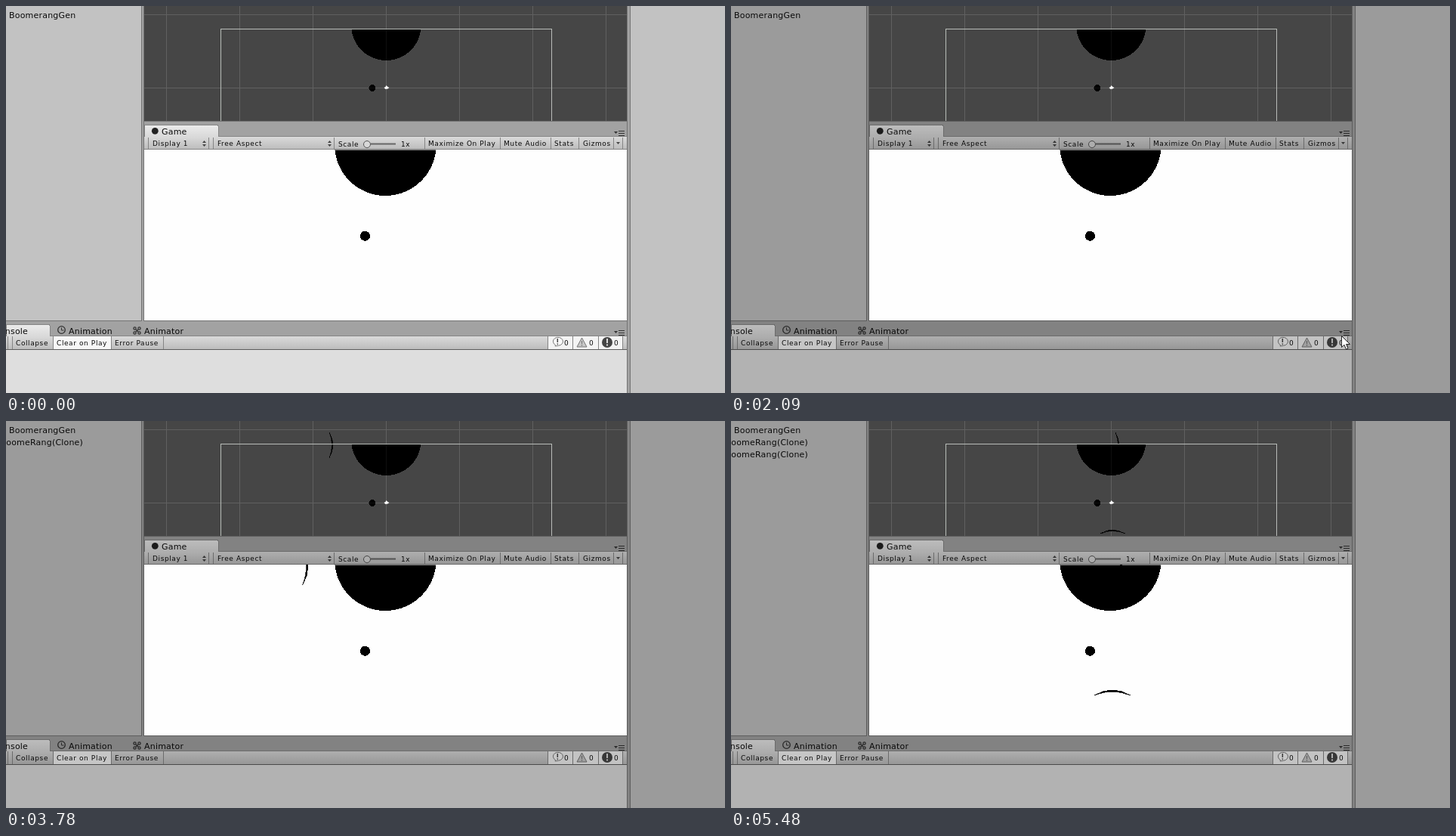
Animation, 952 px wide and 512 px high, one loop 5550 ms. Source, as an HTML page:

```html
<!DOCTYPE html>
<html lang="en">
<head>
<meta charset="utf-8">
<title>Boomerang editor</title>
<style>
html, body { margin: 0; width: 100%; height: 100%; overflow: hidden; }
svg { display: block; width: 952px; height: 512px; }
text { font-family: "DejaVu Sans", sans-serif; fill: #0a0a0a; white-space: pre; }
.label { font-size: 11px; letter-spacing: .2px; }
.tool { font-size: 9px; letter-spacing: .6px; }
.crisp { shape-rendering: crispEdges; }
</style>
</head>
<body>
<svg viewBox="0 0 952 512">
  <defs>
    <linearGradient id="bar" x2="0" y2="1">
      <stop stop-color="#dadada"/><stop offset="1" stop-color="#bdbdbd"/>
    </linearGradient>
    <linearGradient id="tab" x2="0" y2="1">
      <stop stop-color="#ececec"/><stop offset="1" stop-color="#d9d9d9"/>
    </linearGradient>
    <clipPath id="sceneClip"><rect x="183" width="639" height="152"/></clipPath>
    <clipPath id="gameClip"><rect x="183" y="190" width="639" height="226"/></clipPath>
    <clipPath id="frameClip"><rect x="285" y="30.4" width="438" height="156"/></clipPath>
    <path id="blade" d="M-5 -15 Q4.8 1.7 -5 18.3 Q2 1.7 -5 -15Z" stroke="#000" stroke-width=".5"/>
    <g id="world" class="crisp">
      <g clip-path="url(#frameClip)"><circle cx="503.4" cy="25.8" r="46.2"/></g>
      <circle cx="484.9" cy="108.6" r="4.5"/>
      <use id="side" href="#blade"/>
      <use id="down" href="#blade"/>
    </g>
    <g id="menu">
      <path d="M0 2h5l-2.5 3z" fill="#333"/>
      <path d="M6 1.5h8M6 4.5h8M6 7.5h8" stroke="#333"/>
    </g>
    <path id="updown" d="M0 3l2.5-3 2.5 3zM0 5l2.5 3 2.5-3z" fill="#444"/>
  </defs>

  <!-- panels -->
  <g class="crisp">
    <rect width="952" height="512" fill="#a2a2a2"/>
    <rect width="179" height="416" fill="#c2c2c2"/>
    <rect x="827" width="125" height="512" fill="#c2c2c2"/>
    <path d="M179.5 0V416M182.5 0V416M822.5 0V512M826.5 0V512M0 416.5H180M182 416.5H823M182 152.5H823" stroke="#747474" fill="none"/>
    <path d="M183 173V159q0-2 2-2H279q2 0 2 2V173z" fill="url(#tab)" stroke="#858585"/>
    <rect x="183" y="173" width="639" height="16" fill="url(#bar)"/>
    <path d="M281 172.5H822M183 189.5H822" stroke="#858585"/>
    <path d="M0 437V421H56q2 0 2 2V437z" fill="url(#tab)" stroke="#858585"/>
    <rect y="437" width="822" height="17" fill="url(#bar)"/>
    <path d="M58 436.5H822" stroke="#858585"/>
    <rect x="63" y="437" width="76" height="17" fill="#f7f7f7"/>
    <rect x="718" y="437" width="98" height="17" fill="#f4f4f4"/>
    <rect y="455" width="822" height="57" fill="#dedede"/>
    <path d="M0 454.5H822" stroke="#5c5c5c"/>
    <path d="M188.5 174V189M268.5 174V189M274.5 174V189M434.5 174V189M554.5 174V189M654.5 174V189M721.5 174V189M758.5 174V189M804.5 174V189M816.5 174V189M2.5 437V454M8.5 437V454M62.5 437V454M139.5 437V454M208.5 437V454M717.5 437V454M750.5 437V454M784.5 437V454M816.5 437V454" stroke="#858585"/>
  </g>

  <!-- views -->
  <g clip-path="url(#sceneClip)">
    <rect x="183" width="639" height="152" fill="#464646"/>
    <path id="grid" class="crisp" stroke="#606060" fill="none"/>
    <use href="#world"/>
    <path class="crisp" d="M503.5 30V72M457 108.5H550" stroke="#606060" stroke-opacity=".15"/>
    <rect class="crisp" x="284.5" y="30.5" width="438" height="156" fill="none" stroke="#b9bdb9"/>
    <path d="M500.5 108l2-1 1-2 2 2 2 1-2 1.5-3 .5z" fill="#fff"/>
  </g>
  <g clip-path="url(#gameClip)">
    <rect x="183" y="190" width="639" height="226" fill="#fefefe"/>
    <use href="#world" transform="translate(502.5 303) scale(1.456) translate(-503.5 -107.7)"/>
  </g>

  <!-- icons -->
  <circle cx="197.3" cy="165.3" r="4.4" fill="#222"/>
  <use href="#menu" x="805" y="164"/>
  <use href="#menu" x="805" y="428"/>
  <use href="#updown" x="260" y="178"/>
  <use href="#updown" x="426" y="178"/>
  <path d="M808 180h5l-2.5 3z" fill="#444"/>
  <path d="M483 182.5h33" stroke="#666" stroke-width="2"/>
  <circle cx="478" cy="183" r="4.5" fill="#d8d8d8" stroke="#555"/>
  <circle cx="73.5" cy="428.5" r="4.8" fill="none" stroke="#333" stroke-width="1.3"/>
  <path d="M73.5 425.5v3.5h3" fill="none" stroke="#333"/>
  <g fill="none" stroke="#333" stroke-width="1.3">
    <circle cx="170.5" cy="426.5" r="1.6"/><circle cx="176.5" cy="426.5" r="1.6"/>
    <circle cx="170.5" cy="432.5" r="1.6"/><circle cx="176.5" cy="432.5" r="1.6"/>
    <path d="M172 428l3 3M175 428l-3 3"/>
  </g>
  <path d="M727 450l.5-1.5a6.5 5.5 0 1 1 4 .8z" fill="#fafafa" stroke="#777"/>
  <path d="M730.3 440v5M730.3 446.5v1.5" stroke="#444" stroke-width="1.5"/>
  <path d="M762.5 439l6.5 12h-13z" fill="#c8c8c8" stroke="#777"/>
  <path d="M762.5 443v4M762.5 448v1.5" stroke="#777" stroke-width="1.2"/>
  <circle cx="796" cy="445" r="7" fill="#454545"/>
  <path d="M796 440v6M796 447.5v2" stroke="#eee" stroke-width="1.8"/>

  <path id="tint" fill-rule="evenodd" fill-opacity=".2" d="M0 0H952V512H0zM183 0V152H822V0zM183 190V416H822V190z"/>
  <g id="labels"></g>
  <text id="row1" class="label" x="-7.5" y="32"></text>
  <text id="row2" class="label" x="-7.5" y="48"></text>
  <path id="pointer" d="M.5 .5V15.5L4 12.3 6.5 18.2 9 17 6.5 11.5H11.5z" fill="#fff" stroke="#222"/>
</svg>
<script>
const LOOP = 5550, TICK = LOOP / 72;
const HOME = { x: 503.5, y: 30.3 };
const $ = id => document.getElementById(id);

const labels = [
  ["label", 4, 16, "BoomerangGen"], ["label", 206, 170, "Game"],
  ["label", -16, 434, "Console"], ["label", 83, 434, "Animation"], ["label", 183, 434, "Animator"],
  ["tool", 194, 185, "Display 1"], ["tool", 280, 185, "Free Aspect"],
  ["tool", 440, 186, "Scale"], ["tool", 523, 186, "1x"],
  ["tool", 559, 185, "Maximize On Play"], ["tool", 659, 185, "Mute Audio"],
  ["tool", 726, 185, "Stats"], ["tool", 764, 185, "Gizmos"],
  ["tool", 13, 449, "Collapse"], ["tool", 67, 449, "Clear on Play"], ["tool", 144, 449, "Error Pause"],
  ["tool", 739, 449, "0"], ["tool", 772, 449, "0"], ["tool", 805, 449, "0"]
];
for (const [style, x, y, words] of labels) {
  const el = document.createElementNS("http://www.w3.org/2000/svg", "text");
  el.setAttribute("class", style);
  el.setAttribute("x", x);
  el.setAttribute("y", y);
  el.textContent = words;
  $("labels").append(el);
}

let lines = "M183 11.5H822M183 108.5H822";
for (let i = -3; i <= 3; i++) lines += `M${Math.round(503 + i * 97) + .5} 0V152`;
$("grid").setAttribute("d", lines);

// Pointer positions by tick
const pointerAt = { 1: [638, 233], 15: [598, 117], 16: [919, 484], 27: [808, 436], 28: [862, 466] };

const show = (id, on) => $(id).setAttribute("visibility", on ? "visible" : "hidden");
const easeOut = p => 1 - (1 - Math.min(1, p)) ** 3;
// Distance per unit speed: a short run-up, then steady
const runUp = s => s < 160 ? s * s / 320 : s - 80;

function place(id, x, y, angle) {
  show(id, true);
  $(id).setAttribute("transform", `translate(${x.toFixed(2)} ${y.toFixed(2)}) rotate(${angle})`);
}

function moveSide(t, n) {
  const start = 2165, turn = 2862, arrive = 4255, reach = 195.5;
  if (t < start) return show("side", false);
  if (t < turn) return place("side", HOME.x - reach * easeOut((t - start) / (turn - start)), HOME.y, 180);
  if (t < arrive) return place("side", HOME.x - reach + .148 * runUp(t - turn), HOME.y, 0);
  // Overshoots home back and forth
  const off = -2.5 + 13 * (t - arrive) / 1228;
  if (n % 2) place("side", HOME.x + off, HOME.y, 0);
  else place("side", HOME.x - off, HOME.y, 180);
}

function moveDown(t) {
  const start = 3917, turn = 5085, reach = 147.7;
  if (t < start) return show("down", false);
  if (t < turn) place("down", HOME.x, HOME.y + reach * easeOut((t - start) / 1213), 90);
  else place("down", HOME.x, HOME.y + reach - .107 * runUp(t - turn), -90);
}

function draw(time) {
  const n = Math.floor((time % LOOP + 10) / TICK) % 72;
  const t = n * TICK + 10;
  show("tint", n >= 12);
  moveSide(t, n);
  moveDown(t);
  $("row1").textContent = t > 2165 ? "BoomeRang(Clone)" : "";
  $("row2").textContent = t > 3917 ? "BoomeRang(Clone)"
    : t > 2400 && t < 3700 ? "Square_Bullet(Clone)" : "";
  const at = pointerAt[n];
  show("pointer", at);
  if (at) $("pointer").setAttribute("transform", `translate(${at})`);
}

function frame() {
  draw(performance.now());
  requestAnimationFrame(frame);
}
frame();
</script>
</body>
</html>
```
